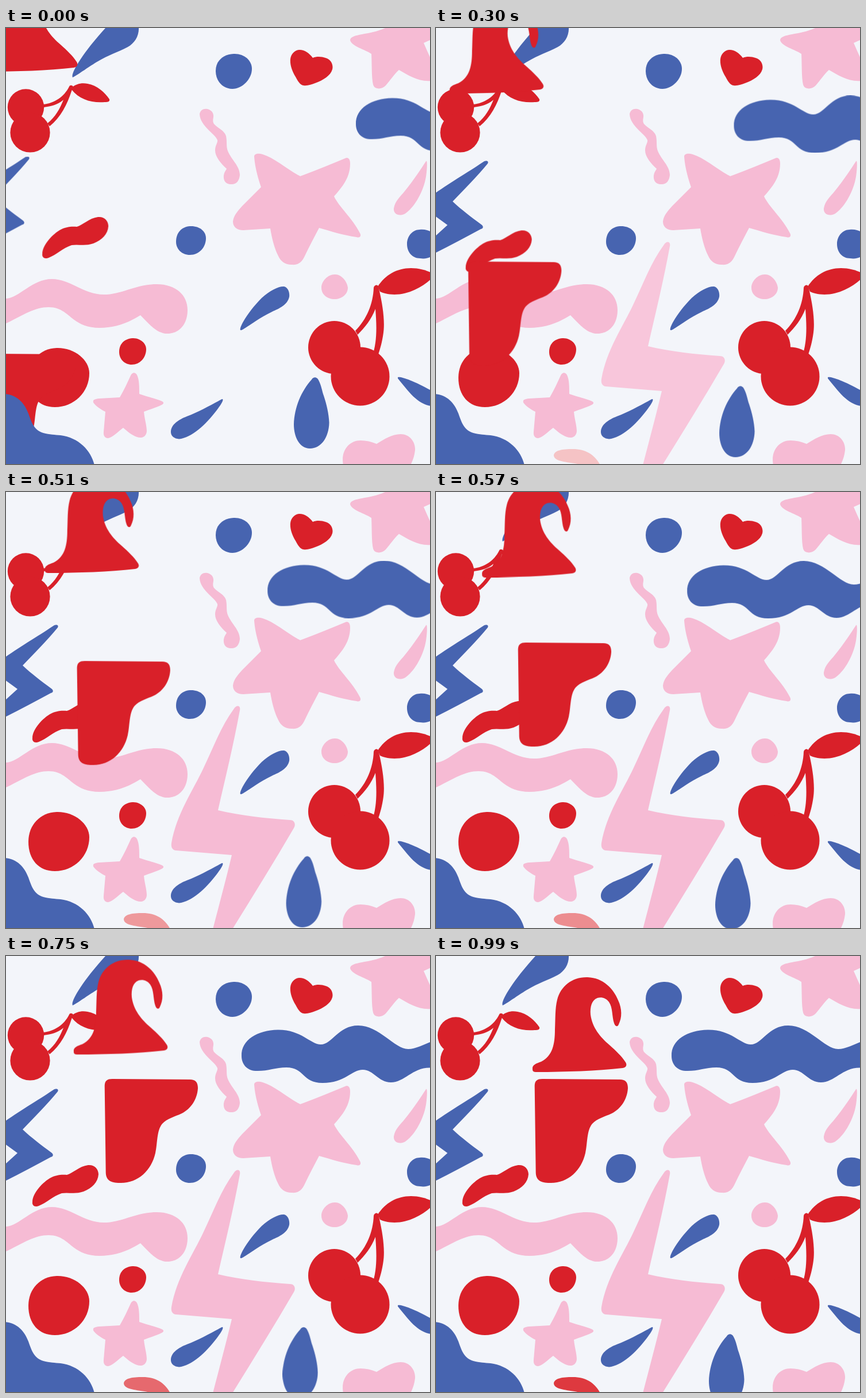
Animation of 738 by 759 pixels, one loop 1.02 s. Source, as an HTML page:

```html
<!DOCTYPE html>
<html lang="en">
<head>
<meta charset="utf-8">
<title>Paper shapes</title>
<style>
  html, body { margin: 0; width: 100%; height: 100%; overflow: hidden; background: #f3f5fa; }
  svg { display: block; width: 100%; height: 100%; }
  .red { fill: #d92029; }
  .blue { fill: #4764b0; }
  .pink { fill: #f6bbd4; }

  /* --x, --y: starting offset from the resting place; the loop has 34 ticks of 30 ms */
  .slide { animation: 1020ms -2ms infinite; }
  .hat  { --x: -207px; --y: -126px; animation-name: slide33; animation-timing-function: steps(33); }
  .drop { --x: 26px; --y: -50px; animation-name: slide33; animation-timing-function: steps(33); }
  .boot { --x: -212px; --y: 353px; animation-name: slide22; animation-timing-function: steps(22); }
  .wave { --x: 199px; --y: -6.5px; animation-name: slide22; animation-timing-function: steps(22); }
  .bean { --x: 17.2px; --y: -35px; animation-name: slide15; animation-timing-function: steps(15); }
  .zap  { --x: -50px; --y: -7.5px; animation-name: slide5; animation-timing-function: steps(5); }

  /* tinted from white, hidden during the first tick */
  .bolt { animation: blush 1020ms steps(12) -2ms infinite, show 1020ms step-end -2ms infinite; }
  .blob { animation: redden 1020ms steps(33) -2ms infinite, show 1020ms step-end -2ms infinite; }

  @keyframes slide33 { 0% { transform: translate(var(--x), var(--y)); } 97.0588%, 100% { transform: translate(0, 0); } }
  @keyframes slide22 { 0% { transform: translate(var(--x), var(--y)); } 64.7059%, 100% { transform: translate(0, 0); } }
  @keyframes slide15 { 0% { transform: translate(var(--x), var(--y)); } 44.1176%, 100% { transform: translate(0, 0); } }
  @keyframes slide5  { 0% { transform: translate(var(--x), var(--y)); } 14.7059%, 100% { transform: translate(0, 0); } }
  @keyframes blush   { 0% { fill: #fff; } 35.2941%, 100% { fill: #f6bbd4; } }
  @keyframes redden  { 0% { fill: #fff; } 97.0588%, 100% { fill: #de393f; } }
  @keyframes show    { 0% { opacity: 0; } 2.9412%, 100% { opacity: 1; } }
</style>
</head>
<body>
<svg viewBox="0 0 738 759" preserveAspectRatio="none">
  <g class="pink">
    <!-- stars -->
    <path d="M599,21 C600,9 636,13 664,-2 H740 V20 L727,26 Q733,40 740,55 V92 C718,94 702,83 684,73 C676,80 668,92 661,100 C655,107 643,107 640,101 C636,92 637,62 636,45 C626,38 600,31 599,21Z"/>
    <path d="M432,224 C432,218 440,218 447,220 C467,226 489,246 512,258 C540,248 565,237 590,227 C596,224 599,229 599,236 C599,260 586,276 571,293 C579,311 603,331 616,357 C619,362 616,366 610,364 C588,361 566,354 545,348 C536,365 527,382 519,399 C514,409 507,413 497,412 C486,412 478,406 474,397 C467,383 463,367 460,349 L413,352 C402,352 395,346 395,337 C396,326 404,318 411,310 C422,299 433,288 444,277 C438,260 433,240 432,224Z"/>
    <path d="M217,605 C220,599 225,599 228,604 C232,612 232,625 232,637 C243,641 260,645 272,650 C275,652 275,654 271,656 C261,661 250,664 240,668 C241,680 245,692 245,702 C244,712 236,715 228,712 C219,709 211,702 204,696 C196,702 188,710 181,713 C174,716 169,711 170,703 C171,690 172,680 173,668 C165,664 156,658 152,652 C151,647 154,646 162,645 C174,644 186,644 198,643 C205,631 211,618 217,605Z"/>
    <!-- squiggles, drop, dot, heart -->
    <path d="M337,150 C338,143 344,140 350,141 C357,142 362,148 361,155 C360,161 360,164 362,167 C369,175 380,178 383,188 C385,198 383,206 386,214 C392,229 407,240 407,256 C406,267 400,273 391,272 C383,272 378,266 379,257 C380,250 383,248 384,245 C374,236 364,224 364,213 C364,204 369,200 368,195 C364,184 338,171 337,150Z"/>
    <path d="M-2,471 C22,472 44,437 80,437 C112,437 135,464 170,464 C202,464 225,446 262,446 C296,446 316,465 316,491 C316,515 302,532 281,532 C262,532 248,514 234,500 C212,514 188,522 163,522 C112,522 112,486 74,486 C46,486 22,505 -2,515Z"/>
    <path d="M731,232 C734,228 733,250 730,264 C725,288 709,314 695,323 C684,329 674,324 675,314 C677,301 686,294 694,284 C708,267 722,246 731,232Z"/>
    <path d="M572,429 C583,428 594,441 595,452 C595,464 584,472 572,472 C559,472 549,464 549,452 C549,441 560,429 572,429Z"/>
    <path d="M587,761 C582,735 598,718 617,718 C627,718 636,720 645,724 C658,716 672,707 687,707 C703,707 713,721 712,735 C711,745 708,753 704,761Z"/>
    <path class="bolt" d="M397,377 C401,370 409,371 407,380 C396,440 382,497 369,554 C407,563 450,568 494,571 C502,571 505,578 501,585 C466,645 430,703 394,761 H360 C372,715 383,674 393,632 L296,624 C289,623 287,618 288,611 C297,560 325,521 344,480 C361,445 374,408 397,377Z"/>
  </g>

  <g class="blue">
    <!-- dots -->
    <path d="M396,45 C414,44 428,56 428,71 C428,89 411,106 394,106 C377,106 365,92 365,75 C365,57 378,46 396,45Z"/>
    <path d="M320,345 C336,344 348,353 348,366 C348,382 336,395 320,395 C306,395 296,385 296,372 C296,356 306,346 320,345Z"/>
    <path d="M720,351 C728,350 735,352 740,355 V398 C734,401 728,402 721,401 C707,401 698,390 698,376 C698,362 708,351 720,351Z"/>
    <!-- drops -->
    <path d="M116,86 C112,80 132,45 174,-1 L231,-2 C232,14 224,26 212,33 C195,42 178,47 160,58 C146,66 126,81 116,86Z"/>
    <path d="M408,526 C405,521 423,492 445,470 C460,456 476,449 484,450 C491,452 494,460 493,468 C490,482 476,488 463,494 C440,505 424,518 412,525 C410,526 409,526 408,526Z"/>
    <path d="M376,646 C380,646 375,654 370,661 C352,686 328,710 305,715 C295,717 286,711 287,702 C288,690 300,682 315,676 C336,668 357,656 376,646Z"/>
    <path d="M682,608 C686,606 708,613 740,631 V658 C716,655 700,632 682,610Z"/>
    <path class="slide drop" d="M506,662 C509,657 515,657 518,663 C523,672 524,682 527,690 C532,705 536,722 536.5,737 C536,762 523,782 503,782 C485,782 475,762 475,740 C476,710 488,682 506,662Z"/>
    <path class="slide wave" d="M410,174 C409,146 438,129 473,128.5 C514,128 530,154 548,154 C568,154 578,121 613,121 C650,121 676,162 700,162 C713,162 725,155 745,147 V195 C710,190 695,220 670,220 C648,220 640,198 621,198 C602,198 590,221 551,221 C515,221 520,194 488,194 C468,194 455,201 434,200 C419,199 410,188 410,174Z"/>
    <path class="slide zap" d="M-2,288 C28,267 62,247 84,232 C89,230 92,232 90,236 C72,258 50,280 29,302 C45,317 60,328 80,343 C83,346 82,349 78,350 C52,364 26,378 -2,392 V363 L20,343 L-2,327Z"/>
  </g>

  <g class="red">
    <path d="M534,52 C541,49 550,50 556,52 C566,55 570,64 568,72 C565,83 552,91 538,96 C532,98 525,101 518,100 C511,99 508,92 504,85 C498,75 494,64 495,54 C496,45 503,38 511,38 C520,38 528,44 534,52Z"/>
    <path d="M220,540 C232,539 244,548 244,559 C244,574 233,586 219,586 C206,586 197,576 197,564 C197,549 207,541 220,540Z"/>
    <path d="M88,557 C118,556 145,577 145,601 C145,634 118,660 85,660 C57,660 39,640 39,609 C39,579 60,558 88,557Z"/>
    <!-- small cherries -->
    <circle cx="34.5" cy="138" r="31.7"/>
    <circle cx="42" cy="182" r="34.6"/>
    <path d="M110,102 C111,99 115,99 117,102 L114,110 C107,132 95,156 76,171 L72,166 C86,155 94,140 100,125 C90,134 78,136 66,138 L65,133 C84,131 101,120 110,102Z"/>
    <path d="M114,104 C122,97 132,95 142,97 C159,100 172,112 180,124 C181,128 178,129 172,129 C150,131 128,125 114,107Z"/>
    <!-- large cherries -->
    <ellipse cx="571.5" cy="556" rx="45.5" ry="46"/>
    <circle cx="616.5" cy="606.5" r="51"/>
    <path d="M640,452 C641,447 647,446 648,450 L650,458 C655,480 659,505 657.5,525 C656,542 652,556 648,568 L640,563 C646,540 645,515 643,489 C636,507 625,521 612,534 L608,527 C628,507 639,480 640,452Z"/>
    <path d="M647,450 C660,430 680,418 705,418 C718,418 730,421 740,426 V437 C724,451 701,464 676,464 C664,464 656,461 651,459Z"/>
    <!-- moving pieces -->
    <path class="blob" d="M254,761 C236,755 206,757 205,744 C206,735 220,733 238,733 C262,733 277,744 286,761Z"/>
    <path class="slide bean" d="M46,428 C46,415 60,397 76,387 C86,381 97,380 106,381 C117,378 127,366 143,364 C154,363 161,371 161,380 C160,394 150,404 135,410 C121,415 108,411 97,413 C82,418 70,430 57,435 C50,438 45,434 46,428Z"/>
    <path class="slide boot" d="M171.7,226 C172,217 176,214 185,214 L320,215 C330,215 334,220 334,230 C333,249 322,266 306,274 C293,280 280,283 272,292 C262,304 264,325 260,343 C253,374 229,396 198,395 C182,395 174,390 173.7,377Z"/>
    <path class="slide hat" d="M168,197 C167,189 175,187 183,184 C203,174 207,153 207,128 C208,109 207,92 211,76 C217,52 238,36 264,37 C291,38 309,57 317,77 C324,92 324,107 318,119 C316,124 312,123 310,117 C306,105 308,90 301,80 C296,73 288,71 281,73 C271,77 268,88 269,102 C272,125 286,141 302,155 C313,165 323,174 330,185 C333,190 331,194 325,195 C280,200 225,202 175,202 C170,202 168,201 168,197Z"/>
  </g>

  <path class="blue" d="M-2,637 C18,638 32,652 39,671 C45,688 49,700 65,705 C76,708 85,708 95,709 C126,713 148,735 154,761 H-2Z"/>
</svg>
</body>
</html>
```
